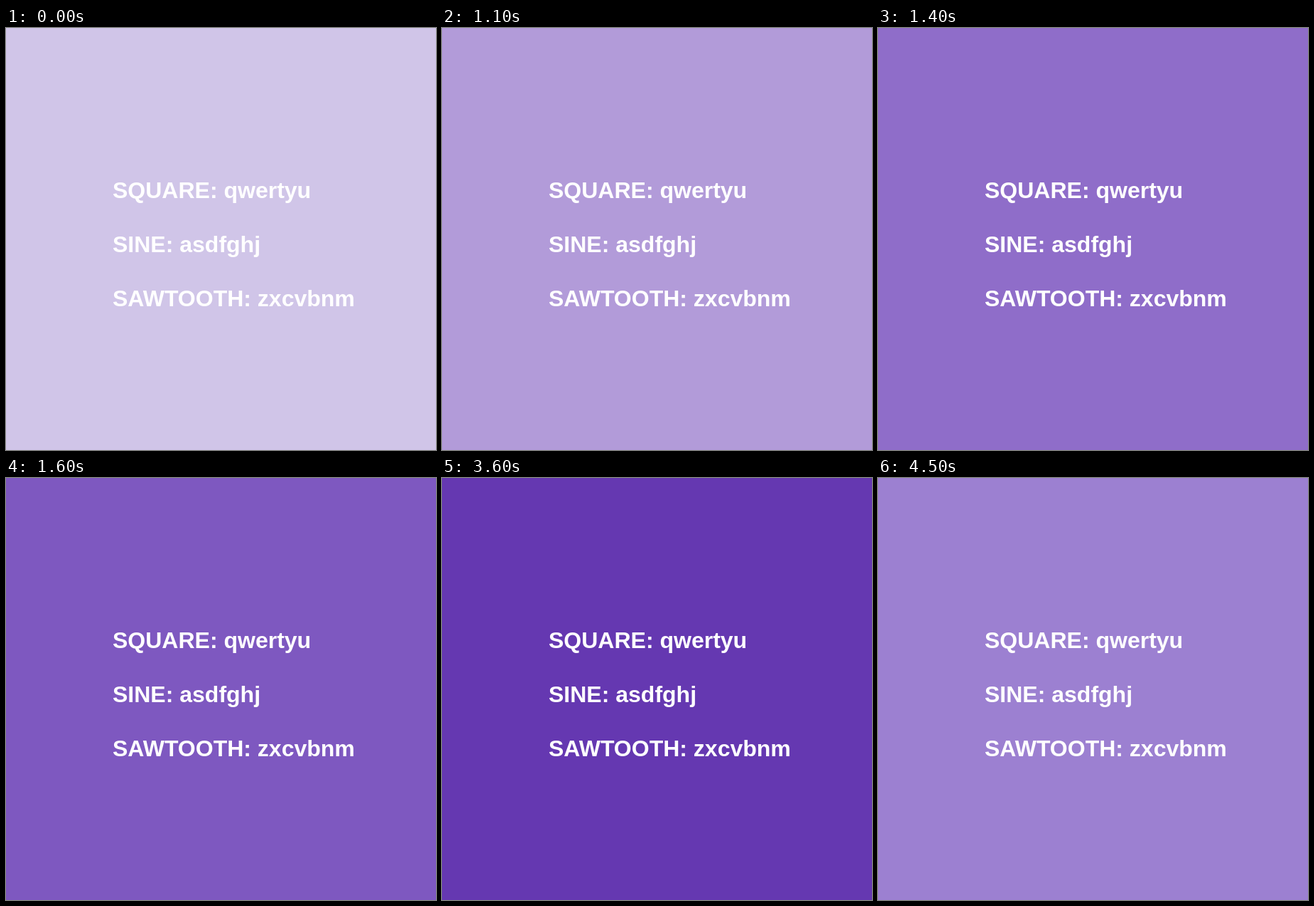
These frames come from a looping animation (605 px wide and 593 px high, 4.7 s). An HTML page:

```html
<!DOCTYPE html>
<html lang="en">
<head>
<meta charset="utf-8">
<style>
  html, body { margin: 0; width: 100%; height: 100%; overflow: hidden; }
  body { background: #d0c5e8; }
  pre {
    position: absolute; left: 150px; top: 190px; margin: 0;
    font: bold 32px/76px "Liberation Sans", Arial, sans-serif;
    color: #fff;
  }
</style>
</head>
<body>
<pre>SQUARE: qwertyu
SINE: asdfghj
SAWTOOTH: zxcvbnm</pre>
<script>
  const LOOP = 4700;
  // [start in ms, background]
  const steps = [
    [0, '#d0c5e8'],
    [1000, '#c5b3e2'], [1100, '#b29bd9'],
    [1300, '#9f82d2'], [1400, '#8f6dc9'],
    [1600, '#7e58c0'], [1700, '#6538b1'],
    [4100, '#764dbb'], [4200, '#8f6dc9'],
    [4500, '#9c80d1']
  ];
  const start = performance.now();

  function draw() {
    const t = (performance.now() - start) % LOOP;
    document.body.style.background = steps.findLast(s => s[0] <= t)[1];
    requestAnimationFrame(draw);
  }
  draw();
</script>
</body>
</html>
```
